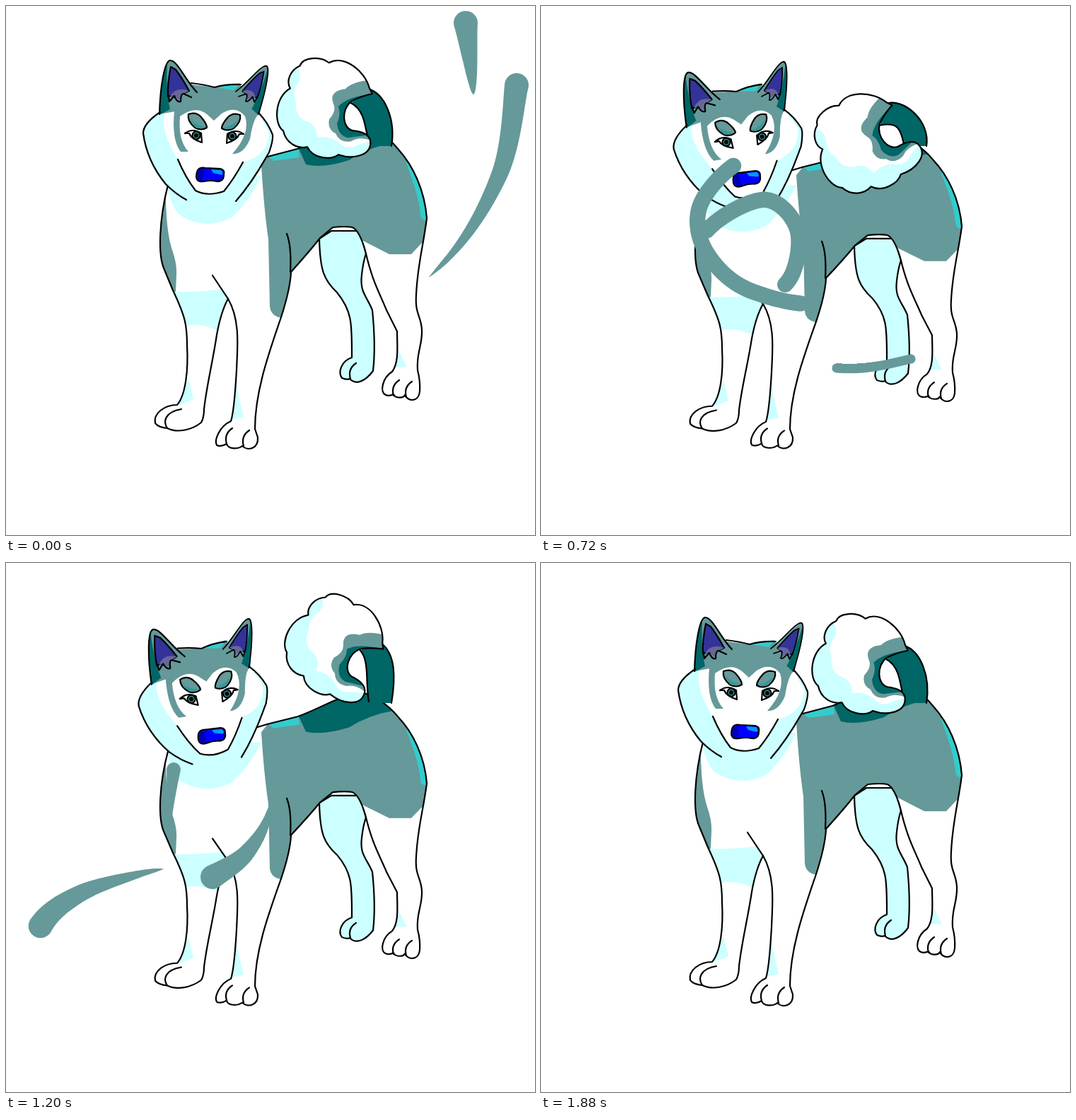
An HTML page with a canvas for the animation above (1.92 s loop, 748 px wide and 748 px high).

```html
<!DOCTYPE html>
<html lang="en">
<head>
<meta charset="utf-8">
<title>Dog in the wind</title>
<style>
html, body { margin: 0; width: 100%; height: 100%; overflow: hidden; background: #fff; }
canvas { display: block; }
</style>
</head>
<body>
<canvas id="stage" width="748" height="748"></canvas>
<script>
const ctx = document.getElementById('stage').getContext('2d');
const LOOP = 1920, STEP = 40, RAD = Math.PI / 180;
const GREY = '#669999', ICE = '#ccffff', DEEP = '#006666', AQUA = '#33cccc', TEAL = '#339999',
  INK = '#000', WHITE = '#fff', VIOLET = '#333399', LILAC = '#666699';
const clamp = (v, lo, hi) => Math.max(lo, Math.min(hi, v));
const lerp = (a, b, k) => a + (b - a) * k;

function fill(d, color, outlined) {
  const path = new Path2D(d);
  ctx.fillStyle = color;
  ctx.fill(path);
  if (outlined) ctx.stroke(path);
}
const line = d => ctx.stroke(new Path2D(d));
function scoped(draw) {
  ctx.save();
  draw();
  ctx.restore();
}

// Catmull-Rom point on a list of [x, y].
function along(points, u) {
  const i = Math.min(Math.floor(u), points.length - 2), f = u - i;
  const [a, b, c, d] = [-1, 0, 1, 2].map(k => points[clamp(i + k, 0, points.length - 1)]);
  return [0, 1].map(k => b[k] + f / 2 * (c[k] - a[k] + f * (2 * a[k] - 5 * b[k] + 4 * c[k] - d[k]
    + f * (3 * (b[k] - c[k]) + d[k] - a[k]))));
}

const legs = 'M229 253C217 300 214 352 224 373L236 402C254 440 256 452 256 480C258 515 254 550 242 564'
  + 'C224 564 208 576 211 590Q216 596 228 597C242 604 262 600 276 589Q280 582 280 570'
  + 'C284 535 292 505 298 465Q304 432 314 414C332 445 327 485 326 515C324 550 322 575 318 587'
  + 'C302 594 294 614 298 621Q304 624 312 619C314 627 328 627 334 622C342 630 357 626 356 610L352 598'
  + 'C352 545 372 490 389 440Q402 400 403 376Q430 346 444 328L462 313Q480 311 490 313Q500 318 508 346'
  + 'C518 390 528 405 538 430L553 460C553 480 556 504 546 517C532 526 528 546 537 550Q542 552 548 549'
  + 'C550 555 562 555 564 550C568 560 584 560 585 545Q586 530 582 515C580 490 589 480 588 458'
  + 'C587 438 578 436 580 408C582 365 590 340 595 300';
const body = legs + 'C592 260 575 225 555 203Q530 172 500 166C470 172 440 192 412 202L370 213L300 235Z';
const farLeg = 'M443 329C444 375 450 388 468 405C490 432 489 450 489 497C474 502 469 518 475 526'
  + 'Q482 529 486 527C496 538 510 528 519 516C522 490 521 460 518 430C510 410 500 405 503 380'
  + 'Q505 362 509 350L500 318H460Z';

function drawBody() {
  fill(farLeg, ICE, true);
  fill(body, WHITE);
  scoped(() => {
    ctx.clip(new Path2D(body));
    fill('M226 250Q225 315 235 345Q242 365 241 380L240 404H200V250Z', GREY);
    fill('M222 235Q235 292 248 297Q282 318 319 299Q345 275 361 240Z', ICE);
    fill('M230 404Q280 405 306 400L316 414L299 459Q275 447 250 453Z', ICE);
    fill('M258 527L265 556L244 565ZM325 533L336 581L316 586ZM556 488L567 511L551 510Z', ICE);
    fill('M361 225Q365 290 371 330L373 425Q375 440 392 441L420 376L464 330L503 331L542 351H573'
      + 'L589 334L610 300L590 200L500 150L380 200Z', GREY);
    fill('M362 205L413 196L415 214L378 219Z', AQUA);
    fill('M411 195L500 155L549 193Q512 200 485 218Q448 230 424 224Z', DEEP);
    fill('M565 220L600 240V302Q587 306 586 295Q584 268 565 220Z', AQUA);
  });
  line(body);
  line('M397 322Q404 340 402 376');
  line('M292 381Q302 396 314 414');
  line('M228 597C222 588 224 574 248 570');
  for (const toe of ['312 619', '336 622', '548 551', '566 553', '487 527'])
    line(`M${toe}q-4-14 8-22`);
}

const fluff = 'M514 116C508 92 478 68 457 80C445 70 420 72 416 84C402 90 396 106 402 116'
  + 'C380 128 378 166 392 176C396 194 412 202 426 199C434 216 460 218 470 210'
  + 'C490 217 518 212 515 190Q512 178 490 176C475 172 474 146 488 135Q500 128 518 124Z';
const ROOT = [532, 165];
const bump = (t, mid, width) => Math.exp(-(((t - mid) / width) ** 2));

function drawTail(t) {
  const turn = (27 * bump(t, 1280, 330) - 38 * bump(t, 740, 322)) * RAD;
  const turned = draw => scoped(() => {
    ctx.translate(...ROOT);
    ctx.rotate(turn);
    ctx.translate(-ROOT[0], -ROOT[1]);
    draw();
  });
  const spin = (x, y) => {
    const [dx, dy] = [x - ROOT[0], y - ROOT[1]], c = Math.cos(turn), s = Math.sin(turn);
    return [ROOT[0] + dx * c - dy * s, ROOT[1] + dx * s + dy * c];
  };
  const outer = `M${spin(512, 117)}C${spin(537, 124)} 551 162 545 198`;
  const inner = `C508 168 ${spin(506, 146)} ${spin(488, 137)}`;

  turned(() => fill('M490 135C473 146 474 172 490 177L512 186L520 150Z', WHITE));
  fill(`${outer}L513 198${inner}Z`, DEEP);
  line(outer);
  line('M513 196' + inner);
  turned(() => {
    fill(fluff, WHITE);
    scoped(() => {
      ctx.clip(new Path2D(fluff));
      fill('M402 80Q422 90 414 108Q404 118 410 135Q408 158 428 164Q440 170 440 186Q455 182 470 192'
        + 'Q482 206 498 196L520 190V225H375V80Z', ICE);
      fill('M520 104Q490 106 480 117Q456 120 463 138Q468 148 457 160Q454 174 466 180'
        + 'Q472 194 488 191Q500 184 516 190V110Z', GREY);
      fill('M520 124Q482 128 470 142Q474 152 468 166Q470 184 484 186L508 183L520 150Z', DEEP);
    });
    line(fluff);
  });
}

function drawEar() {
  const edge = 'M217 153C218 115 224 78 232 77C242 76 254 106 270 122';
  fill(edge + 'L245 148Z', GREY);
  fill('M217 154Q218 95 228 82Q226 120 232 146Z', DEEP);
  fill('M233 86Q228 110 229 128L250 124L259 120Q248 100 240 90Z', VIOLET, true);
  fill('M232 128Q240 113 259 120L249 125L245 133L238 127Z', LILAC);
  line('M229 124L231 135L238 127Q242 137 247 135Q247 124 251 124L262 129');
  line(edge);
}

function drawBrowAndEye(blink) {
  fill('M258 153Q268 149 275 156Q284 166 284 172Q276 177 267 172Q256 163 258 153Z', GREY, true);
  fill('M259 157Q266 168 281 171Q272 175 267 171Z', TEAL);
  if (blink) {
    ctx.lineWidth = 3;
    line('M255 184Q265 179 269 186T281 192');
    ctx.lineWidth = 2.2;
    return;
  }
  line('M253 180Q264 172 276 180L277 193Q262 188 259 180L253 180');
  for (const [r, color] of [[5.5, TEAL], [2, INK]]) {
    ctx.beginPath();
    ctx.arc(269, 183, r, 0, 7);
    ctx.fillStyle = color;
    ctx.fill();
    ctx.stroke();
  }
}

function drawHead(blink) {
  const left = 'M218 150Q194 166 194 180C198 210 212 235 226 252Q240 266 255 274';
  const right = 'C352 245 364 220 372 207Q378 190 377 182Q370 164 357 151';
  const jaw = 'M243 217Q254 243 268 261Q285 270 308 262Q322 245 335 221';
  fill(`${left}Q292 292 325 276${right}L328 111L295 115L262 111Z`, ICE);
  fill(jaw + 'Q370 212 372 180L357 151L300 120L235 135Q207 160 243 217Z', WHITE);
  fill('M228 148H238Q234 190 247 206H258Q243 190 246 156Q268 140 284 153L294 162L305 152'
    + 'Q325 140 338 156Q346 180 320 209Q336 210 345 188Q350 156 359 152L364 125L328 111'
    + 'Q310 112 295 115L262 111L235 120Z', GREY);
  fill('M296 115L331 109L322 119ZM340 135L360 128L357 151Z', AQUA);
  line('M262 109Q280 111 295 115Q312 110 332 111');
  drawEar();
  // The other ear is the same drawing, mirrored and leaning out.
  scoped(() => {
    ctx.translate(357, 153);
    ctx.transform(-.78, -.09, -.3, .88, 0, 0);
    ctx.translate(-217, -153);
    drawEar();
  });
  line(left);
  line('M325 276' + right);
  line(jaw);

  drawBrowAndEye(blink);
  scoped(() => {
    ctx.translate(589, 1);
    ctx.scale(-1, 1);
    drawBrowAndEye(blink);
  });
  const nose = 'M270 235Q272 227 282 229L303 230Q310 232 308 238Q308 249 298 248Q290 246 280 248'
    + 'Q266 250 270 235Z';
  fill(nose, '#0000ff', true);
  fill('M271 236Q274 230 279 231V246L272 247Z', '#0000b0');
  fill('M290 231L304 232Q308 236 305 239L293 236Z', '#0099ff');
}

// Each gust slides along its route; keys hold time, tail and head position on it.
const gusts = [
  { width: 17,
    route: [[722, 112], [697, 240], [612, 370], [450, 484], [283, 468], [215, 390], [235, 317],
      [315, 274], [362, 315], [352, 385], [300, 416], [188, 440], [100, 470], [45, 520], [30, 610]],
    keys: [[0, 0, 2.1], [320, 1.8, 4], [720, 6, 9.2], [1040, 9, 11.8], [1200, 10.7, 12.9],
      [1440, 12.2, 14], [1720, 14, 14]] },
  { width: 17,
    route: [[650, 24], [661, 125], [665, 220], [600, 325], [423, 416], [300, 404], [235, 350],
      [224, 285], [272, 226], [325, 216], [366, 265], [372, 350], [340, 410], [292, 444]],
    keys: [[0, 0, 1], [320, 1.4, 4], [720, 4.4, 8], [1040, 7.2, 11], [1200, 10.9, 13],
      [1320, 13, 13]] },
  { width: 10,
    route: [[735, 240], [718, 383], [650, 458], [523, 499], [418, 512], [285, 480], [250, 428],
      [232, 370], [237, 292]],
    keys: [[160, 0, .4], [320, 1, 2], [720, 3, 4], [1040, 5.3, 6.4], [1200, 7, 8], [1280, 8, 8]] }];

function drawGust({ width, route, keys }, t) {
  const next = keys.findIndex(k => k[0] > t);
  if (next < 1) return;
  const a = keys[next - 1], b = keys[next], k = (t - a[0]) / (b[0] - a[0]);
  const tail = lerp(a[1], b[1], k), head = lerp(a[2], b[2], k);
  // The thick end moves from the tail to the head on the way.
  const shift = clamp((t - 400) / 640, 0, 1);
  ctx.fillStyle = GREY;
  ctx.beginPath();
  for (let v = 0; v <= 1; v += .0025) {
    const [x, y] = along(route, lerp(tail, head, v));
    const r = Math.max(.6, width * lerp(1 - v, v, shift) ** .6);
    ctx.moveTo(x + r, y);
    ctx.arc(x, y, r, 0, 7);
  }
  ctx.fill();
}

function frame(now) {
  const t = Math.floor(now % LOOP / STEP) * STEP;
  const dip = ((1 - Math.cos(2 * Math.PI * t / LOOP)) / 2) ** 1.85;
  ctx.clearRect(0, 0, 748, 748);
  ctx.lineWidth = 2.2;
  ctx.lineCap = ctx.lineJoin = 'round';
  ctx.strokeStyle = INK;

  // The body sinks towards the planted feet.
  scoped(() => {
    ctx.translate(0, 610);
    ctx.scale(1, 1 - .05 * dip);
    ctx.translate(0, -610);
    drawBody();
  });
  drawTail(t);
  scoped(() => {
    ctx.translate(289 + 3 * dip, 239 + 7 * dip);
    ctx.rotate(-13 * dip * RAD);
    ctx.translate(-289, -239);
    drawHead(t >= 880 && t < 1120);
  });
  for (const gust of gusts) drawGust(gust, t);
  requestAnimationFrame(frame);
}
requestAnimationFrame(frame);
</script>
</body>
</html>
```
